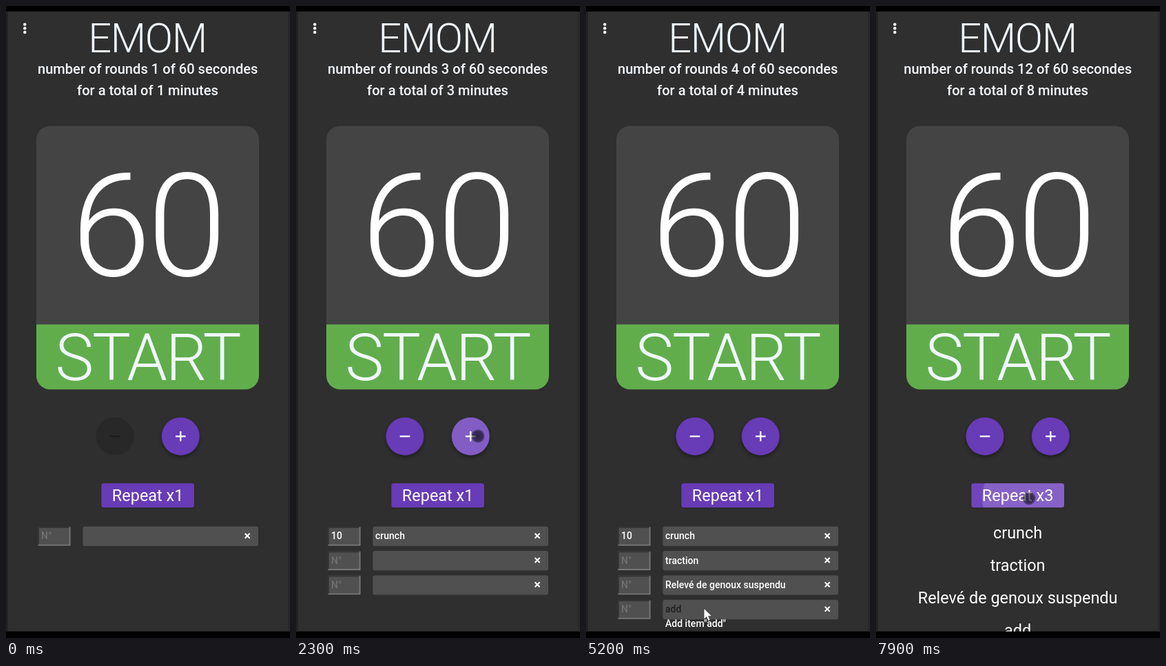
An HTML page for the animation above (8000 ms loop, 412 by 914 pixels).

```html
<!DOCTYPE html>
<html lang="en">
<head>
<meta charset="utf-8">
<title>EMOM timer</title>
<style>
html, body { margin: 0; width: 100%; height: 100%; overflow: hidden; background: #000; }
svg { display: block; width: 412px; height: 914px; font-family: Roboto, sans-serif; }
text { white-space: pre; }
.mid { text-anchor: middle; }
.light { font-weight: 300; fill: #f0f8ff; letter-spacing: -.024em; }
.head { font-size: 20.1px; font-weight: 500; fill: #f4f8fd; }
.big { font-size: 23.45px; fill: #fff; }
.small { font-size: 14px; font-weight: 500; }
</style>
</head>
<body>
<svg viewBox="0 0 412 914" xmlns="http://www.w3.org/2000/svg">
  <defs>
    <clipPath id="page"><rect y="8" width="412" height="896.5"/></clipPath>
    <clipPath id="card"><rect x="44" y="173.5" width="323" height="381" rx="20"/></clipPath>
    <clipPath id="plusClip"><circle cx="253.3" cy="622.3" r="27.4"/></clipPath>
    <clipPath id="repeatClip"><rect x="138.3" y="690.2" width="134.7" height="35" rx="3.5"/></clipPath>
    <clipPath id="listClip"><rect x="112" y="850" width="254" height="54.5"/></clipPath>
    <filter id="drop" x="-30%" y="-30%" width="160%" height="180%">
      <feDropShadow dx="0" dy="3" stdDeviation="3" flood-color="#000" flood-opacity=".38"/>
    </filter>
    <filter id="lift" x="-10%" y="-20%" width="120%" height="160%">
      <feDropShadow dx="0" dy="1" stdDeviation="1.2" flood-color="#000" flood-opacity=".3"/>
    </filter>
    <radialGradient id="touch">
      <stop offset="0" stop-color="#000" stop-opacity=".62"/>
      <stop offset=".7" stop-color="#000" stop-opacity=".56"/>
      <stop offset="1" stop-color="#000" stop-opacity=".3"/>
    </radialGradient>
  </defs>
  <rect width="412" height="914" fill="#000"/>
  <g clip-path="url(#page)">
    <rect y="8" width="412" height="897" fill="#2f2f2f"/>
    <rect y="8" width="3" height="897" fill="#222"/>
    <rect x="409" y="8" width="3" height="897" fill="#282828"/>
    <g fill="#fff"><circle cx="27.3" cy="26.6" r="2.2"/><circle cx="27.3" cy="32.3" r="2.2"/><circle cx="27.3" cy="38" r="2.2"/></g>
    <text class="mid light" x="205" y="66.5" font-size="59.5">EMOM</text>
    <g clip-path="url(#card)">
      <rect x="44" y="173" width="323" height="288" fill="#444"/>
      <rect x="44" y="460.5" width="323" height="95" fill="#61ad4c"/>
    </g>
    <text class="light" x="94.7" y="390" font-size="208" style="fill:#fff">60</text>
    <text class="mid light" x="205.4" y="541" font-size="94">START</text>
    <g id="live"></g>
  </g>
</svg>
<script>
const LOOP = 8000, PITCH = 35.3, ITEM = 19.7;
const MOVES = ['crunch', 'pompe', 'traction', 'Relevé de genoux suspendu'];
const live = document.getElementById('live');

// Button presses; the click counts a moment after the press.
const CLICK = 90;
const plusPress = [1650, 2050, 2350];
const repeatPress = [6702, 7305, 7830];

// Pointer stops: time, x, y
const path = [
  [1300, 150, 787], [1380, 150, 787], [1620, 264, 622], [2480, 264, 622],
  [2800, 158, 820], [3000, 156, 805], [3120, 156, 805], [3300, 150, 861],
  [3400, 150, 861], [3540, 151, 844], [3640, 151, 844], [3900, 160, 874],
  [4250, 165, 877], [4400, 172, 874], [4500, 172, 874]
];
const pathBack = [
  [5350, 176, 888], [5500, 176, 891], [5650, 176, 891], [6300, 218, 718],
  [6450, 218, 718], [6590, 222, 712], [8000, 222, 712]
];

const clamp = v => Math.max(0, Math.min(1, v));
const smooth = v => { v = clamp(v); return v * v * (3 - 2 * v); };
const count = (times, t) => times.filter(p => t >= p + CLICK).length;

function label(s, x, y, cls, fill) {
  const color = fill ? ` fill="${fill}"` : '';
  return `<text class="${cls}" x="${x}" y="${y}"${color}>${s}</text>`;
}

function at(stops, t) {
  for (let i = 1; i < stops.length; i++) {
    const [t0, x0, y0] = stops[i - 1], [t1, x1, y1] = stops[i];
    if (t >= t0 && t < t1) {
      const k = smooth((t - t0) / (t1 - t0));
      return [x0 + (x1 - x0) * k, y0 + (y1 - y0) * k];
    }
  }
  return null;
}

function ripples(presses, t, x, y, size, clip) {
  return presses.map(p => {
    const age = t - p;
    if (age < 0 || age > 560) return '';
    const r = size * (1 - (1 - clamp(age / 225)) ** 3);
    const alpha = .2 * clamp(age / 90) * (1 - clamp((age - 200) / 360));
    return `<g clip-path="url(#${clip})"><circle cx="${x}" cy="${y}" r="${r.toFixed(1)}" fill="#fff" opacity="${alpha.toFixed(3)}"/></g>`;
  }).join('');
}

function fab(x, sign, on) {
  const ink = on ? '#fff' : '#1b1b1b';
  const bar = `M${x - 7.3} 622.3h14.6` + (sign === '+' ? `M${x} 615v14.6` : '');
  return [
    `<circle cx="${x}" cy="622.3" r="27.4" fill="${on ? '#673ab7' : '#282828'}"${on ? ' filter="url(#drop)"' : ''}/>`,
    `<path d="${bar}" stroke="${ink}" stroke-width="2.2" fill="none"/>`
  ];
}

function repeatButton(t, repeat) {
  const box = '<rect x="138.3" y="690.2" width="134.7" height="35" rx="3.5"';
  const hover = t >= 6500 ? `${box} fill="#fff" opacity=".05"/>` : '';
  return `${box} fill="#673ab7" filter="url(#lift)"/>` + hover +
    ripples(repeatPress, t, 222, 712, 100, 'repeatClip') +
    label(`Repeat x${repeat}`, 205.6, 716, 'mid big');
}

function row(i, num, text, ink) {
  const y = 753 + i * PITCH, base = y + 18.2, cy = y + 13.2;
  return `<rect x="46" y="${y}" width="47.5" height="27.5" rx="1.5" fill="#505050"/>` +
    `<path d="M47 ${y + 27}V${y + 1}H93" fill="none" stroke="#363636" stroke-width="2"/>` +
    `<path d="M46.5 ${y + 26.7}H92.6V${y + .5}" fill="none" stroke="#777" stroke-width="1.8"/>` +
    label(num || 'N°', 51, base, 'small', num ? '#fff' : '#707070') +
    `<rect x="111.5" y="${y - .2}" width="254.5" height="28.2" rx="3" fill="#505050"/>` +
    label(text, 115, base, 'small', ink) +
    `<path d="M346.6 ${cy - 3.5}l7 7m0 -7l-7 7" stroke="#fff" stroke-width="2" fill="none"/>`;
}

function caret(i) {
  return `<path d="M116.5 ${753 + i * PITCH + 5.5}v16.5" stroke="#000" stroke-width="1.2"/>`;
}

function options(i, items, scroll = 0) {
  const first = 753 + i * PITCH + 38.7 - scroll;
  return items.map((s, n) => label(s, 115, (first + n * ITEM).toFixed(1), 'small', '#fff')).join('');
}

function form(t, rounds) {
  const num = t < 500 ? '' : t < 600 ? '1' : '10';
  const typed = t < 4800 ? '' : t < 4900 ? 'ad' : 'add';
  const added = t >= 5560;
  const names = [
    t >= 1300 ? MOVES[0] : '',
    t >= 3380 ? MOVES[2] : '',
    t >= 4260 ? MOVES[3] : '',
    typed
  ];
  let s = '';
  for (let i = 0; i < rounds; i++) {
    const ink = i === 3 && !added ? '#1e1e1e' : '#fff';
    s += row(i, i ? '' : num, names[i], ink);
  }
  if (t >= 800 && t < 1300) s += caret(0) + options(0, MOVES);
  if (t >= 3080 && t < 3380) s += caret(1) + options(1, MOVES);
  if (t >= 3550 && t < 4260) {
    const k = smooth((t - 3850) / 250);
    s += caret(2) + `<g clip-path="url(#listClip)">${options(2, MOVES, 39 * k)}</g>` +
      `<rect x="363" y="${851 + 18 * k}" width="2.5" height="35" fill="#666"/>`;
  }
  if (t >= 4420 && t < 4800) s += caret(3) + options(3, MOVES);
  if (typed && !added) s += options(3, [`Add item"${typed}"`]);
  return s;
}

function pointer(t) {
  if (t >= 5150 && t < 5350) {
    const y = 871 + smooth((t - 5220) / 130) * 15;
    return `<path d="M171 ${y}v16l3.8 -3.5 2.5 5.9 2.9 -1.2 -2.5 -5.8h5.1z" fill="#fff" stroke="#333" stroke-width=".8"/>`;
  }
  const p = at(path, t) || at(pathBack, t);
  return p ? `<circle cx="${p[0].toFixed(1)}" cy="${p[1].toFixed(1)}" r="9.5" fill="url(#touch)"/>` : '';
}

function scene(t) {
  const rows = 1 + count(plusPress, t);
  const repeat = 1 + count(repeatPress, t);
  const minutes = rows * Math.max(1, repeat - 1);
  const [minus, minusSign] = fab(158, '-', rows > 1);
  const [plus, plusSign] = fab(253.3, '+', true);
  let s = label(`number of rounds ${rows * repeat} of 60 secondes`, 205.7, 97.5, 'mid head') +
    label(`for a total of ${minutes} minutes`, 205.5, 128.8, 'mid head') +
    minus + minusSign + plus +
    ripples(plusPress, t, 264, 622, 48, 'plusClip') + plusSign +
    repeatButton(t, repeat);
  if (repeat > 1) {
    const done = [MOVES[0], MOVES[2], MOVES[3], 'add'];
    s += done.map((name, i) => label(name, 205.6, 769.5 + i * 47, 'mid big')).join('');
  } else {
    s += form(t, rows);
  }
  return s + pointer(t);
}

let last = '';
const start = performance.now();
function draw() {
  const s = scene((performance.now() - start) % LOOP);
  if (s !== last) live.innerHTML = last = s;
  requestAnimationFrame(draw);
}
draw();
</script>
</body>
</html>
```
